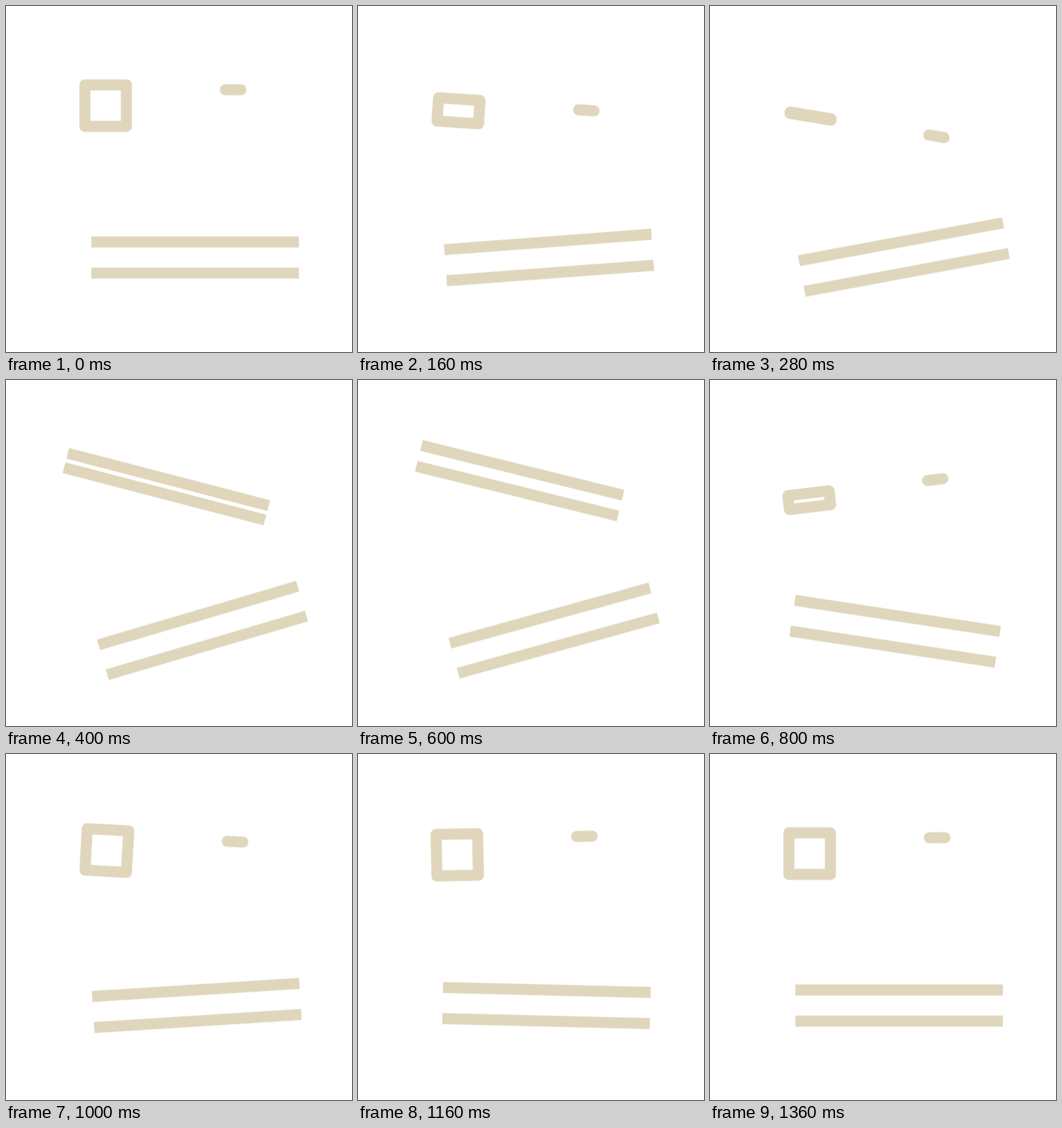
These frames come from a looping animation (500x500 px, 2 s). An HTML page without scripts:

```html
<!DOCTYPE html>
<html lang="en">
<head>
<meta charset="utf-8">
<title>Card flip</title>
<style>
  @property --flip { syntax: "<number>"; inherits: true; initial-value: 1; }

  html, body { margin: 0; width: 100%; height: 100%; overflow: hidden; background: #fff; }
  svg { display: block; width: 100vw; height: 100vh; fill: #dfd6bc; }

  .upper, .lower {
    transform-origin: 0 0;
    animation: swing 2s infinite cubic-bezier(.333, 0, .667, 1);
  }
  .upper { animation-name: swing-upper, flip; }
  .lower { animation-name: swing-lower; }

  /* Positions follow the flip, so line weights stay constant. */
  .chip {
    y: calc(var(--flip) * -59.5px);
    height: calc(var(--flip) * 60px);
    fill: none; stroke: #dfd6bc; stroke-width: 16; stroke-linejoin: round;
  }
  .dash { transform: translateY(calc(var(--flip) * -52.5px)); }
  .near { transform: translateY(calc(var(--flip) * 18.5px)); }
  .far  { transform: translateY(calc(var(--flip) * 61.5px)); }

  .front { animation: show-front 2s infinite step-end; }
  .back  { animation: show-back 2s infinite step-end; }

  @keyframes swing-upper {
    0%, 68%, 100% { transform: rotate(0deg); }
    26.4%, 26.8% { transform: rotate(17.1deg); }
    41% { transform: rotate(-7.2deg); }
    49% { transform: rotate(3.5deg); }
    56% { transform: rotate(-1.9deg); }
    62% { transform: rotate(.9deg); }
  }
  @keyframes swing-lower {
    0%, 68%, 100% { transform: rotate(0deg); }
    26.4%, 26.8% { transform: rotate(-19.2deg); }
    41% { transform: rotate(9deg); }
    49% { transform: rotate(-4deg); }
    56% { transform: rotate(2.3deg); }
    62% { transform: rotate(-1.1deg); }
  }
  @keyframes flip {
    0% { --flip: 1; animation-timing-function: cubic-bezier(.33, 0, .67, .5); }
    8% { --flip: .567; animation-timing-function: linear; }
    20% { --flip: -.495; animation-timing-function: cubic-bezier(.33, .4, .67, 1); }
    26.8% { --flip: -1; animation-timing-function: cubic-bezier(.5, 0, .8, .8); }
    30% { --flip: -.725; animation-timing-function: linear; }
    40% { --flip: .33; animation-timing-function: cubic-bezier(.33, .45, .67, 1); }
    49%, 100% { --flip: 1; }
  }
  @keyframes show-front {
    0%, 36.87% { visibility: visible; }
    14.4% { visibility: hidden; }
  }
  @keyframes show-back {
    0%, 36.87% { visibility: hidden; }
    14.4% { visibility: visible; }
  }
</style>
</head>
<body>
<svg viewBox="0 0 500 500">
  <g transform="translate(226.75 173.5)">
    <g class="upper">
      <g class="front">
        <rect class="chip" x="-112.75" width="60"/>
        <rect class="dash" x="82.25" y="-8" width="38.5" height="16" rx="8"/>
      </g>
      <g class="back">
        <rect class="near" x="-150" y="-8" width="300" height="16"/>
        <rect class="far" x="-150" y="-8" width="300" height="16"/>
      </g>
    </g>
  </g>
  <g transform="translate(273.25 325.5)">
    <g class="lower">
      <rect x="-150" y="7.5" width="300" height="16"/>
      <rect x="-150" y="52.5" width="300" height="16"/>
    </g>
  </g>
</svg>
</body>
</html>
```
